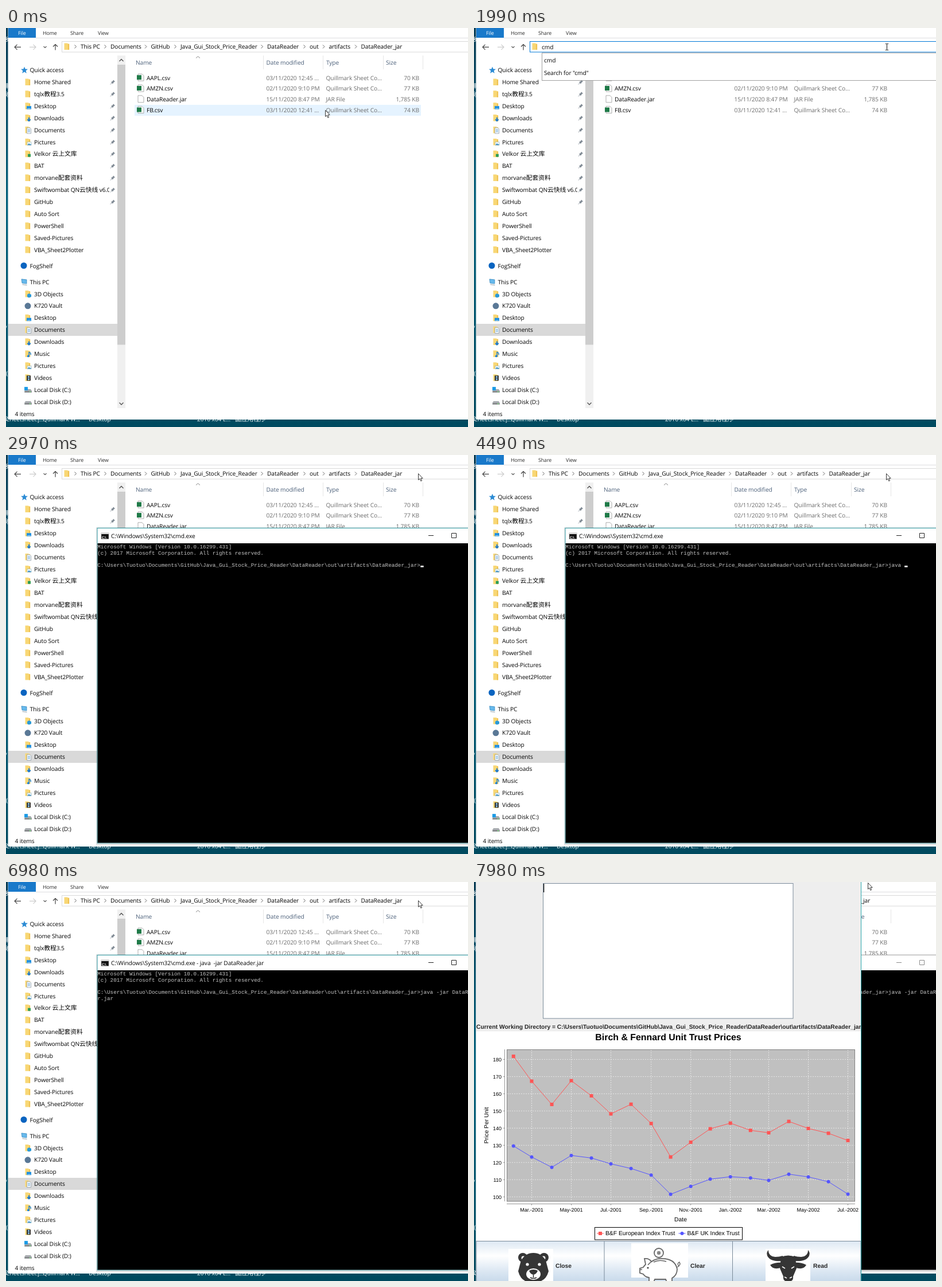
These frames come from a looping animation (805x696 px, 8000 ms). An HTML page:

```html
<!DOCTYPE html>
<html lang="en">
<head>
<meta charset="utf-8">
<title>Running a jar from Explorer</title>
<style>
  html, body { margin: 0; width: 100%; height: 100%; overflow: hidden; background: #fff; }
  svg { display: block; width: 805px; height: 696px; }
  text { font: 10.2px "Open Sans", "Noto Sans", "Noto Sans CJK SC", sans-serif; letter-spacing: -.1px;
    fill: #050505; white-space: pre; text-rendering: geometricPrecision; }
  .tab { font-size: 8.9px; fill: #2b2b2b; }
  .head { fill: #4c607a; }
  .dim { fill: #6d6d6d; }
  .white { fill: #fff; }
  .end { text-anchor: end; }
  .mid { text-anchor: middle; }
  .con { font: 9.29px "Liberation Mono", monospace; letter-spacing: 0; fill: #c4c4c4; }
  .ch { font: 10.3px "Liberation Sans", Arial, sans-serif; letter-spacing: 0; fill: #000; }
  .tick { font-size: 9px; }
  .bold { font-weight: bold; fill: #262626; }
  .title { font-size: 15.9px; font-weight: bold; fill: #000; }
  #frame { stroke: #2f9aa3; }
  #buttons { stroke: #222; fill: none; }
  .inactive #frame { stroke: #b4b4b4; }
  .inactive #buttons { stroke: #8a8a8a; }
</style>
</head>
<body>
<svg id="stage" viewBox="0 0 805 696" xmlns="http://www.w3.org/2000/svg"></svg>
<script>
const LOOP = 8000;
const PROMPT = 'C:\\Users\\Tuotuo\\Documents\\GitHub\\Java_Gui_Stock_Price_Reader\\DataReader\\out\\artifacts\\DataReader_jar>';
const CMD = 'C:\\Windows\\System32\\cmd.exe';
const RUN = 'java -jar DataReader.jar';
const COLS = 120, CELL = 5.574, CON_X = 159.3;

// Markup helpers; Chinese runs are set slightly larger
const esc = s => s.replace(/&/g, '&amp;').replace(/</g, '&lt;').replace(/>/g, '&gt;')
  .replace(/[\u4e00-\u9fff]+/g, '<tspan font-size="10.8">$&</tspan>');
const text = (x, y, s, cls = '', more = '') =>
  `<text x="${x}" y="${y + 3.6}" class="${cls}" ${more}>${esc(s)}</text>`;
const rect = (x, y, w, h, fill, more = '') =>
  `<rect x="${x}" y="${y}" width="${w}" height="${h}" fill="${fill}" ${more}/>`;
const path = (d, stroke, w = 1, fill = 'none') =>
  `<path d="${d}" stroke="${stroke}" stroke-width="${w}" fill="${fill}"/>`;
const shape = (d, fill) => path(d, 'none', 0, fill);
const circle = (x, y, r, fill, more = '') => `<circle cx="${x}" cy="${y}" r="${r}" fill="${fill}" ${more}/>`;
const group = (id, body, more = '') => `<g id="${id}" ${more}>${body}</g>`;
const at = (x, y, body) => `<g transform="translate(${x} ${y})">${body}</g>`;

// Small icons, centred on 0,0
const folder = shape('M-4.5-6H1L2-5H4V5.5H-4.5Z', '#f8d775') + rect(2, -4.5, 2.2, 10, '#efc254');
const page = path('M-3-5H2L4-3V5H-3Z', '#8a98a5', .8, '#fff');
const over = {
  desktop: rect(-2, 0, 8, 5.5, '#1e8fe0') + rect(-1, 4, 6, .8, '#bfe3ff'),
  down: path('M2-1V5M-.8 2.3L2 5L4.8 2.3', '#1b78d0', 2),
  docs: at(1.5, 1, page + path('M-1.5-2H2.5M-1.5 0H2.5M-1.5 2H2.5', '#3f8fd0', .8)),
  pics: rect(-1, 0, 7, 5.5, '#f5fbff', 'stroke="#8aa" stroke-width=".6"') + shape('M-.6 5L2 2L4 4L5.6 3V5.3Z', '#3b8fc9'),
  brand: rect(0, 0, 5, 5, '#2f9e58'),
  cube: shape('M2-1L6 1V5L2 6.5L-1 5V1Z', '#2b9ad8'),
  music: path('M2 4V-3Q6-2 5 2', '#1a80d8', 1.4) + circle(.8, 4, 1.9, '#1a80d8'),
  film: rect(-2, -4, 7, 9, '#333') + rect(0, -3, 3, 3, '#7fb3d8') + rect(0, 1, 3, 3, '#7fb3d8')
};
const icon = kind => folder + (over[kind] || '');
const star = shape('M0-6L1.6-1.9L6-1.7L2.6 1.1L3.8 5.4L0 2.9L-3.8 5.4L-2.6 1.1L-6-1.7L-1.6-1.9Z', '#2b8bd4');
const pc = path('M-5-5L4-4V3L-4 2Z', '#2c80b8', .7, '#67b9ec') + shape('M-3 4L5 5L4 6L-4 5Z', '#9aa7b0');
const drive = shape('M-6 2L-4-1H5L7 2V5H-6Z', '#a5a9ad') + rect(-5, 3, 11, 1, '#666') + rect(3, 3, 2, 1, '#6f6');
const pin = shape('M1-4L4-1L2 0L0 3L-3 0L0-2Z', '#828c96') + path('M-1 1L-4 4', '#828c96', 1);

// Sidebar: label, icon kind; the first eleven folders are pinned
const quick = [['Home Shared'], ['tqlx教程3.5'], ['Desktop', 'desktop'], ['Downloads', 'down'], ['Documents', 'docs'],
  ['Pictures', 'pics'], ['Velkor 云上文库', 'brand'], ['BAT'], ['morvane配套资料'], ['Swiftwombat QN云快线 v6.0.3'],
  ['GitHub'], ['Auto Sort'], ['PowerShell'], ['Saved-Pictures'], ['VBA_Sheet2Plotter']];
const places = [['3D Objects', 'cube'], ['K720 Vault'], ['Desktop', 'desktop'], ['Documents', 'docs'],
  ['Downloads', 'down'], ['Music', 'music'], ['Pictures', 'pics'], ['Videos', 'film'], ['Local Disk (C:)'], ['Local Disk (D:)']];

function sidebar() {
  const step = 20.9;
  let s = at(32, 73.5, star) + text(41.5, 73.5, 'Quick access');
  quick.forEach(([name, kind], i) => {
    const y = 73.5 + step * (i + 1);
    s += at(38, y, icon(kind)) + text(49, y, name, '', 'clip-path="url(#side)"');
    if (i < 11) s += at(186, y, pin);
  });
  s += circle(31, 414.5, 5.5, '#0a64c0') + text(41.5, 415, 'FogShelf');
  s += at(32, 443, pc) + text(41.5, 443, 'This PC') + rect(4, 516, 190, 21, '#d9d9d9');
  places.forEach(([name, kind], i) => {
    const y = 443 + step * (i + 1);
    const pic = i === 1 ? circle(0, 0, 5.5, '#5a7896')
      : i > 7 ? drive + (i === 8 ? rect(-6, -5, 6, 6, '#1c9be6') : '') : icon(kind);
    s += at(38, y, pic) + text(49, y, name);
  });
  s += rect(194, 48, 14, 615, '#f0f0f0') + rect(194, 64, 14, 488.5, '#cdcdcd');
  return s + path('M197.5 58L201 54.5L204.5 58M197.5 653.5L201 657L204.5 653.5', '#505050', 1.3);
}

function fileList() {
  const files = [['AAPL.csv', '03/11/2020 12:45 ...', '70 KB'], ['AMZN.csv', '02/11/2020 9:10 PM', '77 KB'],
    ['DataReader.jar', '15/11/2020 8:47 PM', '1,785 KB'], ['FB.csv', '03/11/2020 12:41 ...', '74 KB']];
  let s = path('M331 52.5L334.5 49.5L338 52.5', '#777', .9);
  [['Name', 226], ['Date modified', 453.5], ['Type', 558], ['Size', 662]].forEach(([h, x]) => s += text(x, 60.5, h, 'head'));
  [448, 552, 657, 726].forEach(x => s += rect(x, 48, 1, 24, '#e6e6e6'));
  s += rect(224, 134, 499, 19, '#e5f3ff', 'id="hover"');
  files.forEach(([name, date, size], i) => {
    const y = 87 + 18.8 * i, jar = i === 2;
    s += at(234, y - .8, path('M-4-6H3L6-3V6H-4Z', '#999', .8, '#fff') + (jar ? '' : rect(-6, -4, 8, 8, '#1f7a48')));
    s += text(245, y, name) + text(453.5, y, date, 'dim') + text(557.5, y, jar ? 'JAR File' : 'Quillmark Sheet Co...', 'dim');
    s += text(720, y, size, 'dim end');
  });
  return s;
}

function addressBar() {
  const crumbs = [['This PC', 130], ['Documents', 182], ['GitHub', 252.5], ['Java_Gui_Stock_Price_Reader', 304],
    ['DataReader', 455], ['out', 529], ['artifacts', 562.5], ['DataReader_jar', 618.5]];
  let s = path('M26 33.3H15M19.5 28.8L15 33.3L19.5 37.8', '#444', 1.2) + path('M41 33.3H52M47.5 28.8L52 33.3L47.5 37.8', '#ccc', 1.2);
  s += path('M65.5 32L68 34.5L70.5 32', '#555', 1.1) + path('M86 38.5V28.5M82 32.5L86 28.5L90 32.5', '#444', 1.2);
  s += rect(97.5, 23.5, 720, 18.5, '#fff', 'stroke="#d9d9d9" id="box"') + at(106, 32.5, folder);
  const list = crumbs.map(([name, x]) => path(`M${x - 10.5} 29.5l3 3l-3 3`, '#666', 1) + text(x, 32.5, name)).join('');
  const edit = rect(117.5, 26, 146.5, 14.5, '#0078d7', 'id="sel"') + text(118, 33, '', '', 'id="typed"');
  return s + group('crumbs', list) + group('edit', edit);
}

function explorer() {
  let s = rect(3.5, 0, 802, 683, '#fff') + rect(4, 0, 48, 17, '#1979ca') + rect(52, 17, 753, 1, '#dcdde0');
  s += text(21, 8, 'File', 'tab white') + text(64, 8, 'Home', 'tab') + text(112, 8, 'Share', 'tab') + text(160, 8, 'View', 'tab');
  s += addressBar() + sidebar() + fileList() + text(15.5, 673, '4 items');
  const drop = rect(118.5, 43.5, 700, 48, '#fff', 'stroke="#a0a0a0"') + text(122, 56, 'cmd') + text(122, 78, 'Search for "cmd"');
  return s + group('drop', drop);
}

function desktop() {
  let s = rect(0, 0, 805, 696, 'url(#sea)');
  [['Cheetsheet.j...', 0], ['Quillmark W...', 64], ['Desktop', 144], ['2016 x64 E...', 333], ['面应用程序', 399]]
    .forEach(([name, x]) => s += text(x, 682, name, 'white'));
  [[20, '乡'], [101, '丰'], [116, '卵'], [344, '-'], [521, 'v'], [584, '·'], [602, '('], [681, 'C']]
    .forEach(([y, c]) => s += text(c === '(' ? 0 : -3.5, y, c, 'white'));
  return s;
}

function consoleWindow() {
  const row = k => 159.6 + 10.6 * k;
  let s = rect(157, 126, 660, 555, '#000', 'opacity=".1"') + rect(159, 127.5, 660, 549.5, '#fff', 'id="frame"');
  s += rect(159.5, 154, 650, 522.5, '#000') + rect(166, 136, 13, 10.5, '#111', 'stroke="#999" stroke-width=".7"') + rect(166, 136, 13, 2, '#ddd');
  s += text(167, 142.5, 'C:\\', 'white', 'style="font-size:6px;font-weight:bold"');
  s += text(183, 141, CMD, '', 'id="caption"') + '<path id="buttons" d="M736 140.5H745M776.5 136.5H784.5V144.5H776.5Z"/>';
  s += text(CON_X, row(0), 'Microsoft Windows [Version 10.0.16299.431]', 'con');
  s += text(CON_X, row(1), '(c) 2017 Microsoft Corporation. All rights reserved.', 'con');
  s += text(CON_X, row(3), '', 'con', 'id="line1"') + text(CON_X, row(4), '', 'con', 'id="line2"');
  return s + rect(0, 0, 5.4, 2.8, '#eee', 'id="caret"');
}

// Price chart: monthly values from February 2001
const euro = [181.8, 167.3, 153.8, 167.6, 158.8, 148.3, 153.9, 142.7, 123.2, 131.8, 139.6, 142.9, 138.7, 137.3, 143.9, 139.8, 137, 132.8];
const uk = [129.6, 123.2, 117.2, 124.1, 122.6, 119.2, 116.5, 112.7, 101.5, 106.1, 110.3, 111.7, 111, 109.6, 113.2, 111.6, 108.8, 101.6];
const dayX = m => 68.8 + (Date.UTC(2001, 1 + m) - Date.UTC(2001, 1)) / 864e5 * 1.1315;
const priceY = v => 549.2 - (v - 100) * 2.997;

function chart() {
  let s = rect(4, 260.5, 670, 366, '#fff') + text(338.5, 272.5, 'Birch & Fennard Unit Trust Prices', 'ch title mid');
  s += rect(57.5, 292.5, 606, 264.5, '#c0c0c0', 'stroke="#808080"');
  let grid = '', ticks = 'M53.5 292V557M57 561.5H664';
  for (let v = 100; v <= 180; v += 10) {
    const y = priceY(v);
    grid += `M58 ${y}H663`;
    ticks += `M51 ${y}h2.5`;
    s += text(48, y, String(v), 'ch tick end');
  }
  ['Mar.', 'May', 'Jul.', 'Sep.', 'Nov.', 'Jan.', 'Mar.', 'May', 'Jul.'].forEach((name, i) => {
    const x = dayX(1 + 2 * i);
    grid += `M${x} 293V557`;
    ticks += `M${x} 561.5v2.5`;
    s += text(x, 571.2, `${name}-${i < 5 ? 2001 : 2002}`, 'ch tick mid');
  });
  s += `<path d="${grid}" stroke="#fff" stroke-width=".7" stroke-dasharray="2 2" opacity=".85"/>` + path(ticks, '#888', .9);
  const red = '#ff5555', blue = '#5555ff';
  const square = (x, y) => rect(x - 3, y - 3, 6, 6, red), dot = (x, y) => circle(x, y, 3, blue);
  const series = (data, color, mark) => {
    const pts = data.map((v, m) => [dayX(m), priceY(v)]);
    return path('M' + pts.join('L'), color, 1) + pts.map(p => mark(...p)).join('');
  };
  s += series(euro, red, square) + series(uk, blue, dot);
  s += text(360, 588, 'Date', 'ch mid') + text(0, 0, 'Price Per Unit', 'ch mid', 'transform="translate(21.5 424.5) rotate(-90)"');
  s += rect(210.5, 602.5, 257, 21.5, '#fff', 'stroke="#000"') + path('M214 613H226', red) + square(220, 613);
  s += path('M356.5 613H368.5', blue) + dot(362.5, 613);
  return s + text(229, 612.5, 'B&F European Index Trust', 'ch') + text(371.5, 612.5, 'B&F UK Index Trust', 'ch');
}

const ink = '#353535';
const mirror = (cx, body) => body + `<g transform="translate(${2 * cx} 0) scale(-1 1)">${body}</g>`;
const bear = mirror(103.5, circle(85, 655, 8, ink) + circle(86, 656, 3.4, '#fff'))
  + shape('M82 660Q90 647 103.5 647Q117 647 125 660L130 679Q126 694 114 697H92Q81 694 77 679Z', ink)
  + mirror(103.5, circle(93, 667, 2.6, '#fff'))
  + '<ellipse cx="103.5" cy="684" rx="12.5" ry="10" fill="#fff"/>'
  + shape('M96 678Q103.5 674 111 678Q109 684 103.5 685Q98 684 96 678Z', ink) + path('M103.5 685V690M98 690Q103.5 693 109 690', ink, 1.6);
const pig = path('M303 668Q313 656 328 657Q350 657 354 675Q354 686 345 691V698H336L334 693H315L313 698H305V690Q298 689 295 684L289 682V674L295 672Q297 669 299 667L297 657Q305 656 309 662', '#666', 1.8, '#fff')
  + path('M354 672Q361 668 358 663Q353 665 357 671M313 663Q323 658 335 662M289 676H293', '#666', 1.4) + circle(303, 673, 1.6, '#444')
  + circle(322, 647, 8, '#fff', 'stroke="#666" stroke-width="1.8"') + circle(322, 647, 3.2, '#888');
const bull = mirror(547.5, shape('M538 661Q516 663 511 652Q509 646 513 642Q513 653 525 654Q532 654 538 652Z', ink)
    + shape('M537 664Q526 663 516 668Q522 678 536 672Z', ink))
  + shape('M535 654Q547.5 649 560 654L562 674L556 688Q557 697 547.5 697Q538 697 539 688L533 674Z', ink)
  + mirror(547.5, path('M537 671L542 674M541 689L545 691', '#fff', 1.5));

function form() {
  let s = rect(4, 0, 670, 696, '#eee') + rect(120.5, 2.5, 435.5, 235.5, '#fff', 'stroke="#7a8a99"') + rect(121, 3, 1.3, 15, '#111');
  s += text(4, 252, 'Current Working Directory = ' + PROMPT.slice(0, -1), 'ch bold', 'clip-path="url(#form)"') + chart();
  [[4, 142, 'Close', 60, 640, 78, bear], [227, 377, 'Clear', 274, 630, 99, pig], [450.5, 591, 'Read', 508, 640, 78, bull]]
    .forEach(([x, tx, name, ix, iy, iw, art]) => {
      s += rect(x, 626.5, 223.5, 85, 'url(#metal)', 'stroke="#7a8a99"') + rect(ix, iy, iw, 60, '#fff') + art + text(tx, 669, name, 'ch bold');
    });
  return s;
}

const stage = document.getElementById('stage');
stage.innerHTML = `<defs>
  <linearGradient id="sea" x2="0" y2="1"><stop stop-color="#0b3d55"/><stop offset=".45" stop-color="#0a6680"/><stop offset="1" stop-color="#004a5f"/></linearGradient>
  <linearGradient id="metal" x2="0" y2="1"><stop stop-color="#dde8f3"/><stop offset=".3" stop-color="#fff"/><stop offset=".6" stop-color="#dde8f3"/><stop offset="1" stop-color="#b8cfe5"/></linearGradient>
  <clipPath id="side"><rect width="180" height="696"/></clipPath>
  <clipPath id="form-clip"><rect width="674" height="696"/></clipPath></defs>`
  + desktop() + explorer() + group('console', consoleWindow())
  + group('java', rect(3.5, 0, 670.5, 696, '#fdfdfd') + group('form', form().replace('url(#form)', 'url(#form-clip)')) + rect(674, 0, 1, 696, '#2fa8ad'))
  + group('beam', path('M-2.5-5.5H-.7L0-5L.7-5.5H2.5M0-5V5M-2.5 5.5H-.7L0 5L.7 5.5H2.5', '#111', 1), 'transform="translate(719.5 33)"')
  + group('arrow', path('M.5.5V11.5L3 9.3L4.8 13.5L6.6 12.7L4.9 8.7H8.2Z', '#222', .9, '#fff'));

const ui = {};
stage.querySelectorAll('[id]').forEach(n => ui[n.id] = n);
const show = (n, on) => n.setAttribute('display', on ? 'inline' : 'none');
const latest = (steps, t) => steps.filter(s => s[0] <= t).pop();

const pointer = [[0, 556, 143], [500, 712, 24], [2970, 718, 32], [7980, 686, 1]];
const address = [[0, '', 0], [990, CMD, 146.5], [1490, '', 0], [1990, 'cmd', 0], [2480, 'cmd', 21]];
// time, characters typed, caret visible
const typing = [[0, 0, 0], [2970, 0, 1], [3490, 1, 1], [3990, 4, 1], [4490, 5, 1], [4990, 6, 0],
  [5490, 10, 1], [5990, 11, 0], [6490, RUN.length, 1], [6980, RUN.length, 0]];

function draw(t) {
  const editing = t >= 990 && t < 2970;
  show(ui.hover, t < 500);
  show(ui.crumbs, !editing);
  show(ui.edit, editing);
  show(ui.drop, t >= 1990 && t < 2480);
  ui.box.setAttribute('stroke', editing ? '#0078d7' : '#d9d9d9');
  const [, word, width] = latest(address, t);
  ui.typed.textContent = word;
  ui.typed.setAttribute('class', width ? 'white' : '');
  ui.sel.setAttribute('width', width);

  show(ui.console, t >= 2970);
  ui.console.setAttribute('class', t >= 7480 ? 'inactive' : '');
  const [, count, caret] = latest(typing, t);
  const line = PROMPT + RUN.slice(0, count);
  ui.line1.textContent = line.slice(0, COLS);
  ui.line2.textContent = line.slice(COLS);
  ui.caret.setAttribute('x', CON_X + line.length % COLS * CELL);
  ui.caret.setAttribute('y', line.length < COLS ? 193 : 203.5);
  show(ui.caret, caret);
  ui.caption.textContent = CMD + (t >= 6980 ? ' - java  -jar DataReader.jar' : '');

  show(ui.java, t >= 7480);
  show(ui.form, t >= 7980);
  show(ui.beam, editing);
  show(ui.arrow, !editing);
  const [, x, y] = latest(pointer, t);
  ui.arrow.setAttribute('transform', `translate(${x} ${y})`);
}

function tick() {
  draw(performance.now() % LOOP);
  requestAnimationFrame(tick);
}
tick();
</script>
</body>
</html>
```
